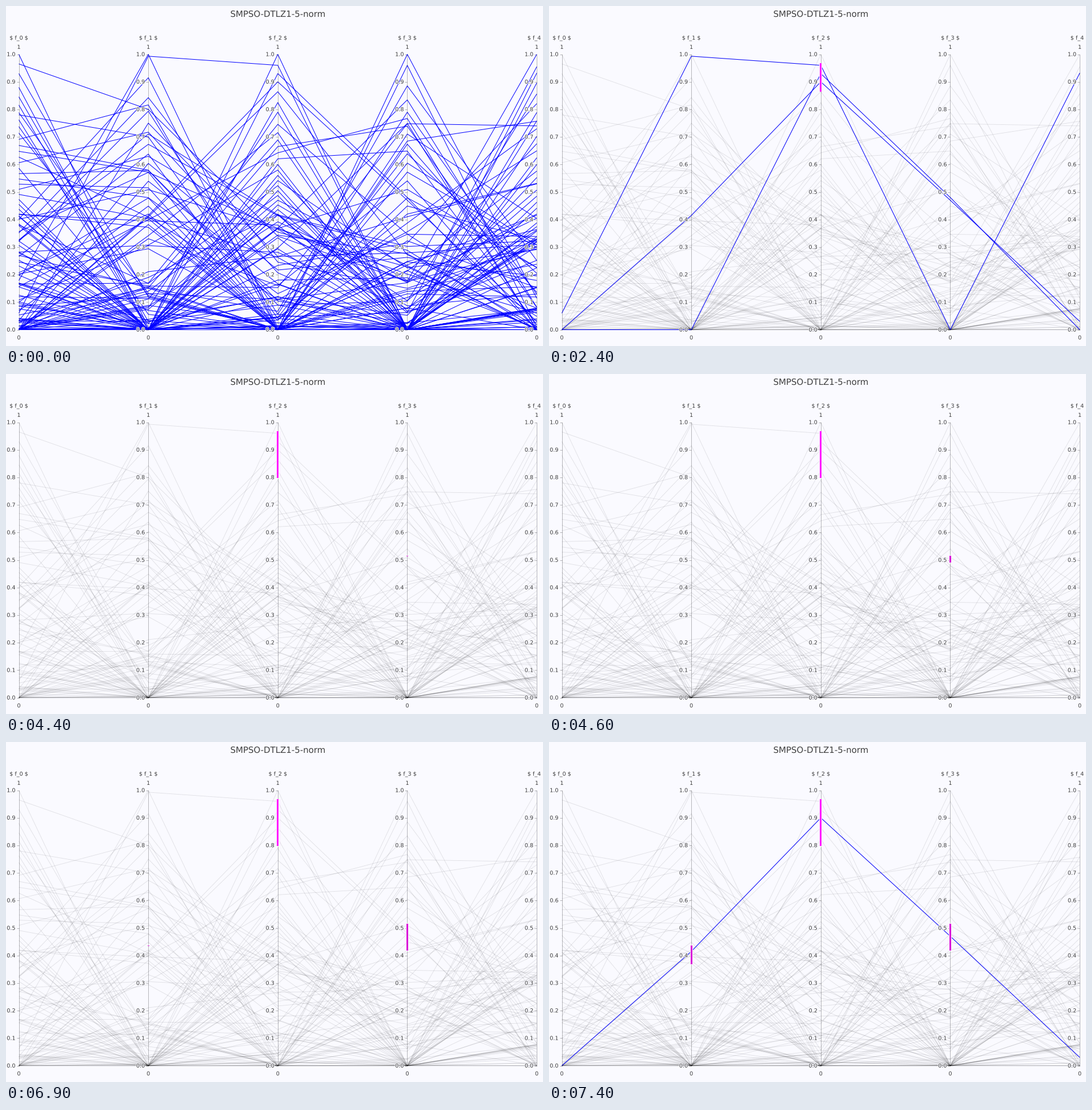
Recreate the animation shown at these times as a matplotlib script. Size 940 by 595 pixels, loop 9400 ms.

```python
import numpy as np
import matplotlib.pyplot as plt
from matplotlib.animation import FuncAnimation
from matplotlib.collections import LineCollection
from matplotlib.patches import Rectangle
from matplotlib.patheffects import withStroke

W, H, DPI = 940, 595, 100
TOP, BOTTOM = 84.5, 566.5
AXES_X = 22.5 + 226.65 * np.arange(5)
BG, INK = "#fafaff", "#3f3f3f"
PX = 72 / DPI  # points per pixel

# Solutions picked by the brushes, then a few outliers; N is filled at random.
N = np.nan
KEY_ROWS = [
    (.06, .993, .96, 0, .932), (0, .415, .90, .47, .03),
    (0, 0, .93, .48, 0), (0, .41, .864, .272, .078),
    (.095, 0, .825, 0, 0), (.965, .80, N, N, N), (.78, .70, N, N, N),
    (.418, .395, .38, N, N), (N, N, N, .748, .74), (N, N, N, .685, .757),
]
START = (.93, .915, .79, .96, .955)   # highest peak below 1 on each axis
COUNT = (23, 14, 18, 15, 20)          # peaks per axis
FOLLOW = (.5, 0, .15, .2, 0)          # chance that the next axis stays close
ZERO_SHARE = (.15, .35, .33, .35, .2)

# axis, fixed end, first and last position of the dragged end, start, steps
BRUSHES = [
    (2, 100, 107, 182, 20, 8),
    (3, 317.5, 318.5, 365, 44, 9),
    (1, 355.5, 356.5, 389, 69, 6),
]


def make_data():
    rng = np.random.default_rng(12)
    rows = [list(r) for r in KEY_ROWS]
    for k, (start, count) in enumerate(zip(START, COUNT)):
        tail = start - (start - .42) * np.linspace(0, 1, count) ** .75
        for p in [1, *tail]:
            row = [N] * 5
            row[k] = p
            if p < .7 and rng.random() < FOLLOW[k]:
                row[k + 1] = p + rng.uniform(-.14, .14)
            rows.append(row)
    data = np.array(rows)
    low = .42 * rng.random(data.shape) ** 1.4
    low[rng.random(data.shape) < ZERO_SHARE] = 0
    return np.where(np.isnan(data), low, data)


def to_y(v):
    return BOTTOM - (BOTTOM - TOP) * v


def to_value(y):
    return (BOTTOM - y) / (BOTTOM - TOP)


data = make_data()
lines = np.stack([np.broadcast_to(AXES_X, data.shape), to_y(data)], axis=-1)

plt.rcParams["font.family"] = "DejaVu Sans"
fig = plt.figure(figsize=(W / DPI, H / DPI), dpi=DPI, facecolor=BG)
ax = fig.add_axes([0, 0, 1, 1])
ax.set(xlim=(0, W), ylim=(H, 0))
ax.axis("off")


def label(x, y, text, size=9.6, ha="center"):
    ax.text(x, y, text, fontsize=size * PX, color=INK, ha=ha, va="baseline",
            parse_math=False, zorder=6,
            path_effects=[withStroke(linewidth=2 * PX, foreground=BG)])


def rule(xs, ys):
    ax.plot(xs, ys, color="black", alpha=.27, lw=PX,
            solid_capstyle="butt", zorder=3)


def line_layer(color, alpha, width, zorder):
    layer = LineCollection([], colors=color, alpha=alpha,
                           linewidths=width * PX, zorder=zorder)
    return ax.add_collection(layer, autolim=False)


def block(color, zorder):
    return ax.add_patch(Rectangle((0, 0), 0, 0, fc=color, lw=0, zorder=zorder))


label(475.8, 19, "SMPSO-DTLZ1-5-norm", 14.95)
for k, x in enumerate(AXES_X):
    label(x, 59, f"$ f_{k} $")
    label(x, 75, "1")
    label(x, 583.5, "0")
    rule([x, x], [TOP, BOTTOM])
    for i in range(11):
        y = to_y(i / 10)
        label(x - 6, y + 3.2, f"{i / 10:.1f}", ha="right")
        rule([x - 4, x], [y, y])

context = line_layer("black", .1, .9, 1)
context.set_segments(lines)
chosen = line_layer("blue", 1, 1, 2)
bars = [(block("white", 4), block("#ff00ff" if b[0] == 2 else "#d800d8", 5))
        for b in BRUSHES]


def place(patch, x, half, top, bottom):
    patch.set_bounds(x - half, top, 2 * half, bottom - top)


def update(n):
    keep = np.ones(len(data), bool)
    for (k, top, first, last, start, steps), (halo, bar) in zip(BRUSHES, bars):
        active = n >= start
        halo.set_visible(active)
        bar.set_visible(active)
        if not active:
            continue
        t = min((n - start) / (steps - 1), 1)
        end = first + (last - first) * t
        place(halo, AXES_X[k], 2.5, top - .5, end + .5)
        place(bar, AXES_X[k], 1.5, top, end)
        v = data[:, k]
        keep &= (v <= to_value(top)) & (v >= to_value(end))
    context.set_visible(n >= BRUSHES[0][4])
    chosen.set_segments(lines[keep])
    return [context, chosen] + [p for pair in bars for p in pair]


anim = FuncAnimation(fig, update, frames=94, interval=100, repeat=True,
                     repeat_delay=0, blit=False)
plt.show()
```
